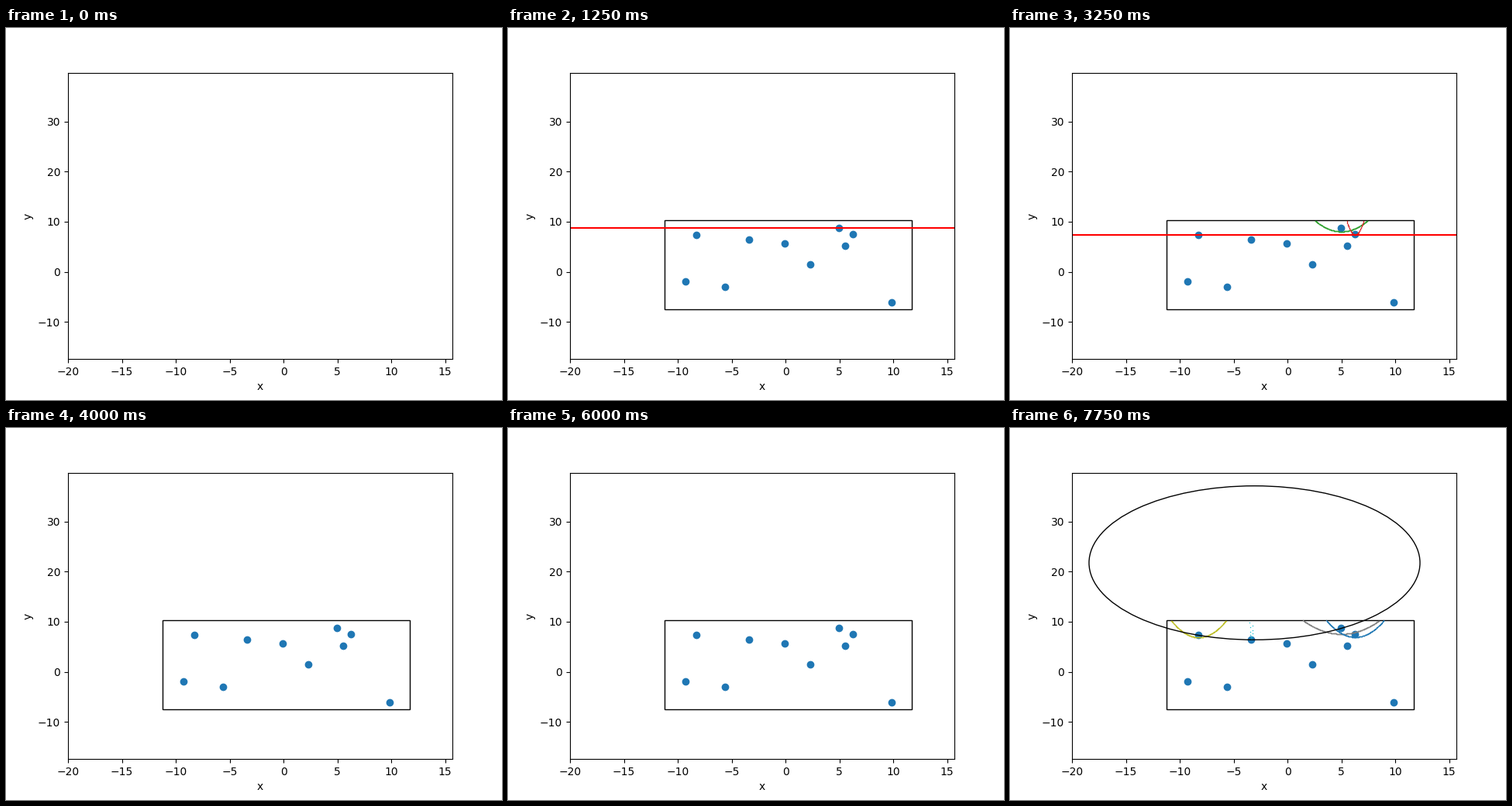
A matplotlib script for the animation above (8000 ms loop, 640 px wide and 480 px high).

```python
import numpy as np
import matplotlib.pyplot as plt
from matplotlib.animation import ArtistAnimation
from matplotlib.patches import Circle, Rectangle

LEFT, RIGHT, BOTTOM, TOP = -11.2, 11.75, -7.49, 10.24
A, B, C, D = (4.99, 8.71), (6.28, 7.46), (-8.25, 7.35), (-3.36, 6.39)
SITES = [A, B, C, D, (-9.26, -1.96), (-5.59, -3.05), (-0.05, 5.6),
         (2.32, 1.44), (5.55, 5.17), (9.88, -6.13)]
RADIUS = 15.36
CIRCLE_BOTTOM = D[1] - 0.003

fig, ax = plt.subplots(figsize=(6.4, 4.8), dpi=100)
ax.set(xlim=(-20, 15.68), ylim=(-17.42, 39.75), xlabel="x", ylabel="y")
ax.set_autoscale_on(False)

shown = []
frames = [[]]
arc_count = 0


def show(artist):
    shown.append(artist)
    frames.append(list(shown))
    return artist


def hide(artist):
    shown.remove(artist)
    frames.append(list(shown))


def sweep_line(y):
    return show(ax.axhline(y, color="red"))


def arc(site, directrix):
    """Dotted parabola around a site, cut off at the box top."""
    global arc_count
    arc_count += 1
    sx, sy = site
    x = np.linspace(LEFT, RIGHT, 1000)
    y = (x - sx) ** 2 / (2 * (sy - directrix)) + (sy + directrix) / 2
    keep = y <= TOP
    return show(ax.scatter(x[keep], y[keep], s=1, linewidths=0,
                           color=f"C{arc_count % 10}"))


def event(y, sites):
    """Draw the line and its arcs one by one, then take them away."""
    line = sweep_line(y)
    arcs = [arc(site, y) for site in sites]
    for artist in [line] + arcs:
        hide(artist)


show(ax.scatter(*zip(*SITES), color="C0"))
show(ax.add_patch(Rectangle((LEFT, BOTTOM), RIGHT - LEFT, TOP - BOTTOM,
                            fill=False)))

event(TOP, [])
event(A[1], [])
event(B[1], [A])
event(C[1], [A, B])
event(D[1], [A, C, B])

# Circle event: the arcs stay after the line has gone.
line = sweep_line(CIRCLE_BOTTOM)
for site in (A, C, D, B):
    arc(site, CIRCLE_BOTTOM)
show(ax.add_patch(Circle((-3.06, CIRCLE_BOTTOM + RADIUS), RADIUS, fill=False)))
hide(line)

anim = ArtistAnimation(fig, frames, interval=250, repeat=True, repeat_delay=0)
plt.show()
```
